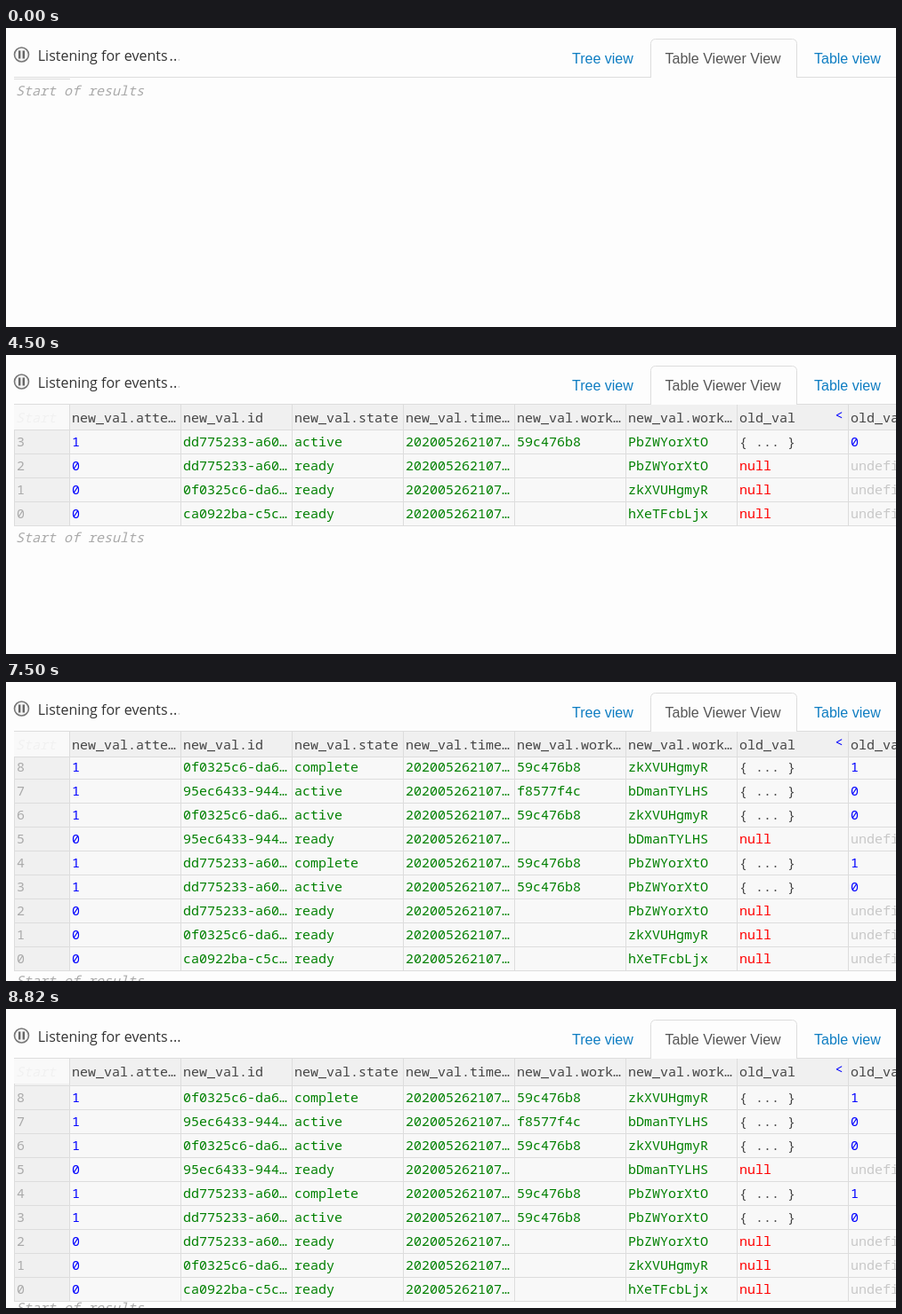
An HTML page that plays this animation: 1000 by 337 pixels, repeating every 9.18 s.

```html
<!DOCTYPE html>
<html lang="en">
<head>
<meta charset="utf-8">
<title>Event table</title>
<style>
  html, body { margin: 0; width: 100%; height: 100%; overflow: hidden; background: #fdfdfd; }
  svg { display: block; width: 1000px; height: 337px; }
  text { white-space: pre; }
  .status { font: 16px "Open Sans", sans-serif; fill: #333; }
  .tab { font: 16px "Liberation Sans", Arial, sans-serif; fill: #0e7dc2; }
  .tab.on { fill: #555; }
  .mono { font: 15px "Noto Sans Mono", "DejaVu Sans Mono", monospace; }
  .start { font-style: italic; fill: #aaa; }
  .ghost { fill: #f1f1f1; }
  .line { fill: #ddd; }
  .head { fill: #444; }
  .index { fill: #aaa; }
  .num { fill: #00f; }
  .str { fill: #008000; }
  .null { fill: #f00; }
  .obj { fill: #444; }
  .undef { fill: #c8c8c8; }
</style>
</head>
<body>
<svg viewBox="0 0 1000 337">
  <defs>
    <clipPath id="clip"><rect id="area" x="0" y="56" width="947" height="281"/></clipPath>
  </defs>
  <rect width="1000" height="337" fill="#fdfdfd"/>

  <circle cx="17.5" cy="30" r="8" fill="#f4f4f4" stroke="#777" stroke-width="1.6"/>
  <path d="M14 25.5h2.4v9H14zM18.6 25.5h2.4v9h-2.4z" fill="#666"/>
  <text class="status" x="35.8" y="37">Listening for events</text>
  <g id="dots" class="status"></g>

  <rect class="line" x="9" y="55" width="991" height="1"/>
  <path d="M724.5 56V17.5a5 5 0 0 1 5-5h154a5 5 0 0 1 5 5V56" fill="#fdfdfd" stroke="#ddd"/>
  <text class="tab" x="636" y="40">Tree view</text>
  <text class="tab on" x="740.5" y="40">Table Viewer View</text>
  <text class="tab" x="908" y="40">Table view</text>

  <rect id="empty" class="line" x="9" y="57" width="63" height="1"/>
  <text id="start" class="mono start" x="11">Start of results</text>
  <g id="table" class="mono" clip-path="url(#clip)">
    <g id="under"></g>
    <g id="rows"></g>
    <g id="header"></g>
  </g>
</svg>
<script>
const LOOP = 9180, TOP = 85, ROW = 27;
const edges = [9, ...Array.from({ length: 8 }, (_, i) => 71 + 125 * i)];
const heads = ['new_val.atte…', 'new_val.id', 'new_val.state', 'new_val.time…',
  'new_val.work…', 'new_val.work…', 'old_val', 'old_val.atte…'];

const jobs = {
  a: ['ca0922ba-c5c…', 'hXeTFcbLjx'], b: ['0f0325c6-da6…', 'zkXVUHgmyR'],
  c: ['dd775233-a60…', 'PbZWYorXtO'], d: ['95ec6433-944…', 'bDmanTYLHS']
};
// arrival time, job, state, worker
const events = [
  [420, 'a', 'ready', ''],
  [2280, 'b', 'ready', ''],
  [4260, 'c', 'ready', ''],
  [4500, 'c', 'active', '59c476b8'],
  [5520, 'c', 'complete', '59c476b8'],
  [6180, 'd', 'ready', ''],
  [6540, 'b', 'active', '59c476b8'],
  [6780, 'd', 'active', 'f8577f4c'],
  [7500, 'b', 'complete', '59c476b8']
];

const $ = id => document.getElementById(id);

function add(parent, tag, attrs, text) {
  const el = document.createElementNS(parent.namespaceURI, tag);
  for (const k in attrs) el.setAttribute(k, attrs[k]);
  if (text !== undefined) el.textContent = text;
  parent.appendChild(el);
  return el;
}
const box = (g, x, y, w, h, fill) => add(g, 'rect', { x, y, width: w, height: h, fill });
const label = (g, x, y, cls, text) => add(g, 'text', { x, y, class: cls }, text);

// Returns the bottom line, so that it can be moved
function grid(g, y, h, fill) {
  box(g, 9, y, 62, h, '#f0f0f0');
  box(g, 71, y, 929, h, fill);
  for (const x of edges) box(g, x, y, 1, h, '#ddd');
  return box(g, 9, y + h - 1, 991, 1, '#ddd');
}

function buildRow([, job, state, worker], i) {
  const [id, name] = jobs[job];
  const fresh = state === 'ready';
  const g = add($('rows'), 'g', {});
  grid(g, 0, ROW, '#f8f8f8');
  const cells = [
    ['index', i], ['num', fresh ? 0 : 1], ['str', id], ['str', state],
    ['str', '202005262107…'], ['str', worker], ['str', name],
    fresh ? ['null', 'null'] : ['obj', '{ ... }'],
    fresh ? ['undef', 'undefined'] : ['num', state === 'active' ? 0 : 1]
  ];
  cells.forEach(([cls, text], c) => label(g, edges[c] + 3, 18, cls, text));
  return g;
}

grid($('under'), 56, 31, '#f0f0f0');
const rows = events.map(buildRow);
const header = $('header');
const rule = grid(header, 56, 29, '#f0f0f0');
box(header, 9, 56, 62, 28, '#f9f9f9');
label(header, 11, 76, 'start ghost', 'Start');
heads.forEach((text, i) => label(header, edges[i + 1] + 3, 76, 'head', text));
const fold = label(header, 931.5, 73, 'num', '<');
const dots = [0, 1, 2].map(i => label($('dots'), 183.5 + i * 4.4, 37, '', '.'));

const show = (el, on) => el.setAttribute('visibility', on ? 'visible' : 'hidden');

// Dots light up in turn; the third one only in every other cycle
function dotLevel(i, t) {
  const turn = (t + 540) / 1440;
  const p = turn % 1 * 1440;
  const lit = p >= [0, 240, 720][i] && (i < 2 || Math.floor(turn) % 2 === 0);
  return !lit ? .2 : p >= 1380 ? .5 : 1;
}

function draw(t) {
  const n = events.filter(e => e[0] <= t).length;
  const full = n === events.length;
  const shift = full ? Math.floor((t - 7380) / 360) - 2 : 0;
  const wide = n > 3;

  rows.forEach((g, i) => {
    show(g, i < n);
    g.setAttribute('transform', `translate(0 ${TOP + ROW * (n - 1 - i) + shift})`);
  });
  for (const id of ['table', 'under', 'header']) show($(id), n > 0);
  show($('empty'), n === 0);
  show(fold, wide);
  rule.setAttribute('y', TOP - 1 + Math.max(0, shift));
  $('area').setAttribute('width', wide ? 1000 : 947);
  $('start').setAttribute('y', n ? Math.min(103 + ROW * n, 342) : 76);
  dots.forEach((dot, i) => dot.setAttribute('opacity', dotLevel(i, t)));
}

const begin = performance.now();
function tick() {
  draw((performance.now() - begin) % LOOP);
  requestAnimationFrame(tick);
}
draw(0);
requestAnimationFrame(tick);
</script>
</body>
</html>
```
